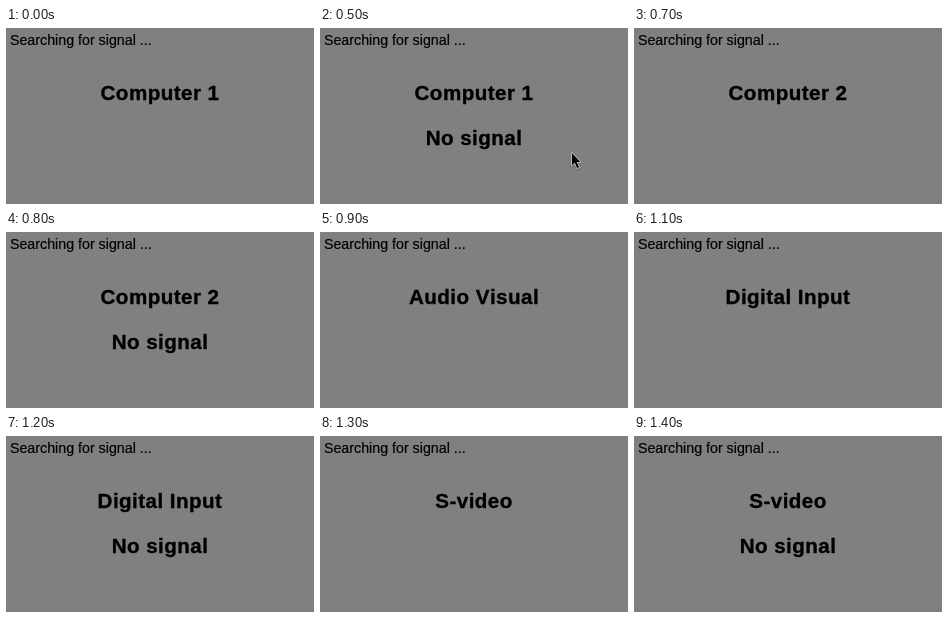
Write an HTML page with a canvas that moves like this. It is 308 by 176 pixels and loops after 1.5 s.

```html
<!DOCTYPE html>
<html lang="en">
<head>
<meta charset="utf-8">
<title>Searching for signal</title>
<style>
  html, body { margin: 0; width: 100%; height: 100%; overflow: hidden; background: #808080; }
  canvas { display: block; }
</style>
</head>
<body>
<canvas id="stage" width="308" height="176"></canvas>
<script>
const ctx = document.getElementById('stage').getContext('2d');
const FAMILY = '"Liberation Sans", Arial, sans-serif';
const LOOP = 1500;

// Each input is shown alone first, then with the "No signal" line.
const inputs = [
  { name: 'Computer 1', start: 0, fail: 500, pointer: true },
  { name: 'Computer 2', start: 700, fail: 800 },
  { name: 'Audio Visual', start: 900, fail: 1000 },
  { name: 'Digital Input', start: 1100, fail: 1200 },
  { name: 'S-video', start: 1300, fail: 1400 }
];

// A thin stroke gives the letters a slightly heavier weight.
function text(str, x, y, font, align, spacing, weight) {
  ctx.font = font + ' ' + FAMILY;
  ctx.textAlign = align;
  ctx.letterSpacing = spacing + 'px';
  ctx.fillStyle = ctx.strokeStyle = '#000';
  ctx.lineWidth = weight;
  ctx.lineJoin = 'round';
  ctx.fillText(str, x, y);
  ctx.strokeText(str, x, y);
}

function heading(str, y) {
  text(str, 154, y, 'bold 20.6px', 'center', 0.45, 0.35);
}

function pointer(x, y) {
  const outline = [[0, 0], [0, 12.2], [2.8, 9.7], [5, 15], [7, 14.2], [4.8, 9], [8.4, 9]];
  ctx.save();
  ctx.translate(x, y);
  ctx.beginPath();
  outline.forEach(([px, py]) => ctx.lineTo(px, py));
  ctx.closePath();
  ctx.shadowColor = 'rgba(0, 0, 0, 0.3)';
  ctx.shadowBlur = 2;
  ctx.shadowOffsetY = 1;
  ctx.strokeStyle = '#d8d8d8';
  ctx.lineWidth = 1.4;
  ctx.stroke();
  ctx.shadowColor = 'transparent';
  ctx.fillStyle = '#000';
  ctx.fill();
  ctx.restore();
}

function draw(t) {
  const input = inputs.filter(i => t >= i.start).pop();
  ctx.fillStyle = '#808080';
  ctx.fillRect(0, 0, 308, 176);
  ctx.fontKerning = 'none';
  text('Searching for signal ...', 3.9, 17, '14.25px', 'left', 0, 0.2);
  heading(input.name, 72);
  if (t >= input.fail) {
    heading('No signal', 117);
    if (input.pointer) pointer(252, 125);
  }
}

const begin = performance.now();
function tick() {
  draw((performance.now() - begin) % LOOP);
  requestAnimationFrame(tick);
}
tick();
</script>
</body>
</html>
```
